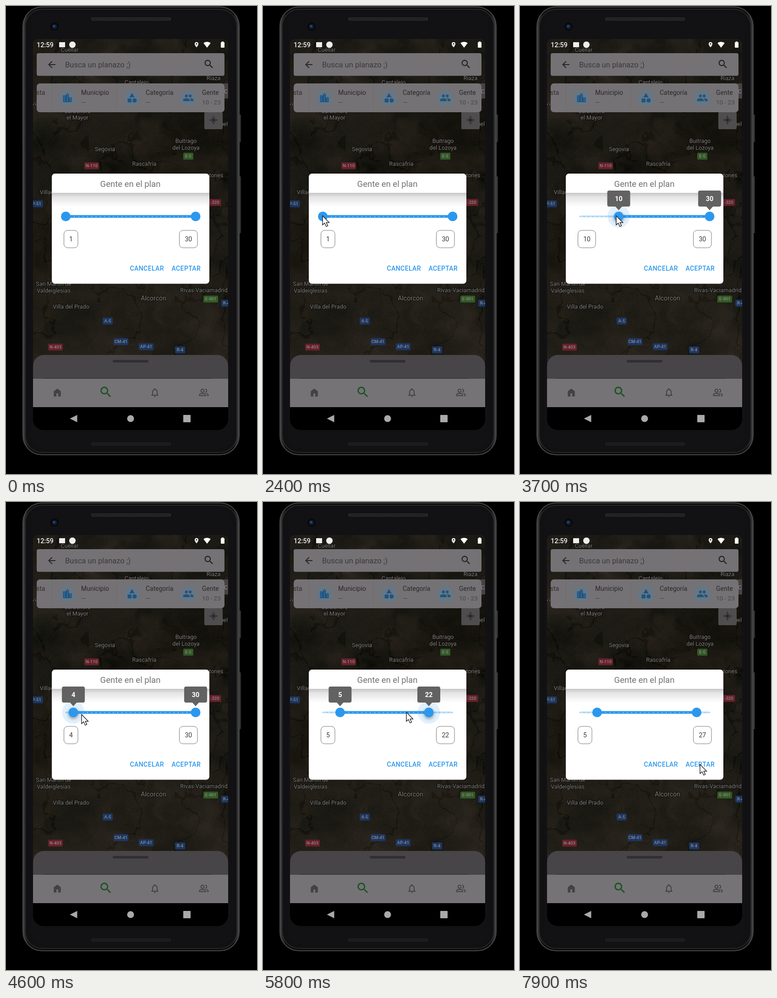
Recreate the animation shown at these times as an HTML page with a canvas. Size 548 by 1022 pixels, loop 8000 ms.

```html
<!DOCTYPE html>
<html lang="es">
<head>
<meta charset="utf-8">
<title>Gente en el plan</title>
<style>
html, body { margin: 0; width: 100%; height: 100%; overflow: hidden; background: #000; }
canvas { display: block; }
</style>
</head>
<body>
<canvas id="stage" width="548" height="1022"></canvas>
<script>
const W = 548, H = 1022, LOOP = 8000, FRAME = 100;
const BLUE = '#2b98ee', DIM = '#747275';
const view = document.getElementById('stage').getContext('2d');
const scene = document.createElement('canvas');
scene.width = W; scene.height = H;
let g = scene.getContext('2d');

function box(x, y, w, h, r, fill, stroke, line = 1) {
  g.beginPath();
  g.roundRect(x, y, w, h, r);
  if (fill) { g.fillStyle = fill; g.fill(); }
  if (stroke) { g.strokeStyle = stroke; g.lineWidth = line; g.stroke(); }
}
function disc(x, y, r, fill) {
  g.beginPath();
  g.arc(x, y, r, 0, 7);
  g.fillStyle = fill;
  g.fill();
}
// y is the middle of the capital letters
function text(s, x, y, size, fill, align = 'left', weight = 400, spacing = 0) {
  g.font = `${weight} ${size}px Roboto, sans-serif`;
  g.letterSpacing = spacing + 'px';
  g.textAlign = align;
  g.fillStyle = fill;
  g.fillText(s, x, y + size * .355);
}
// Paths use a 24 unit grid centred on x, y
function icon(d, x, y, size, fill, stroke) {
  g.save();
  g.translate(x - size / 2, y - size / 2);
  g.scale(size / 24, size / 24);
  const path = new Path2D(d);
  if (fill) { g.fillStyle = fill; g.fill(path, 'evenodd'); }
  if (stroke) { g.strokeStyle = stroke; g.lineWidth = 2; g.stroke(path); }
  g.restore();
}

const ICONS = {
  back: 'M20 11H7.8l5.6-5.6L12 4l-8 8 8 8 1.4-1.4L7.8 13H20z',
  search: 'M15.5 14h-.8l-.3-.3A6.5 6.5 0 1 0 13.7 14.4l.3.3v.8l5 5 1.5-1.5zM9.5 14a4.5 4.5 0 1 1 0-9 4.5 4.5 0 0 1 0 9z',
  city: 'M15 11V5l-3-3-3 3v2H3v14h18V11zM5 9h2v2H5zM5 13h2v2H5zM5 17h2v2H5zM11 5h2v2h-2zM11 9h2v2h-2zM11 13h2v2h-2zM11 17h2v2h-2zM17 13h2v2h-2zM17 17h2v2h-2z',
  category: 'M12 2l-5.5 9h11zM3 13.5h8v8H3zM13 17.5a4.5 4.5 0 1 0 9 0 4.5 4.5 0 1 0-9 0z',
  people: 'M5 8a3 3 0 1 0 6 0 3 3 0 1 0-6 0zM13 8a3 3 0 1 0 6 0 3 3 0 1 0-6 0zM8 13c-2.3 0-7 1.2-7 3.5V19h14v-2.5C15 14.2 10.3 13 8 13zM16 13l-1 .1c1.200.8 2 2 2 3.400V19h6v-2.500c0-2.300-4.700-3.500-7-3.500z',
  group: 'M5.500 8a3.500 3.500 0 1 0 7 0 3.500 3.500 0 1 0-7 0zM2 19v-2c0-4 14-4 14 0v2zM15 4.500a3.500 3.500 0 0 1 0 7M18 14c3 1 4 2 4 5h-3',
  home: 'M4 21V9l8-6 8 6v12h-6v-7h-4v7z',
  bell: 'M12 22a2 2 0 0 0 2-2h-4a2 2 0 0 0 2 2zM18 16v-5c0-3.100-1.600-5.600-4.500-6.300V4a1.500 1.500 0 0 0-3 0v.7C7.600 5.400 6 7.900 6 11v5l-2 2v1h16v-1zM16 17H8v-6c0-2.500 1.500-4.500 4-4.500s4 2 4 4.500z',
  pin: 'M12 2a7 7 0 0 0-7 7c0 5.200 7 13 7 13s7-7.800 7-13a7 7 0 0 0-7-7zM12 11.500a2.500 2.500 0 1 1 0-5 2.500 2.500 0 0 1 0 5z',
  wifi: 'M12 21L1 7c6-5 16-5 22 0z',
  target: 'M8 12a4 4 0 1 0 8 0 4 4 0 1 0-8 0zM5 12a7 7 0 1 0 14 0 7 7 0 1 0-14 0zM6 12a6 6 0 1 0 12 0 6 6 0 1 0-12 0zM11 1h2v4h-2zM11 19h2v4h-2zM1 11h4v2H1zM19 11h4v2h-4z'
};

function hash(x, y) {
  let n = Math.imul(x, 374761393) + Math.imul(y, 668265263);
  n = Math.imul(n ^ (n >>> 13), 1274126177);
  return ((n ^ (n >>> 16)) >>> 0) / 4294967296;
}
function noise(x, y) {
  const i = Math.floor(x), j = Math.floor(y), smooth = v => v * v * (3 - 2 * v);
  const u = smooth(x - i), v = smooth(y - j);
  const top = hash(i, j) * (1 - u) + hash(i + 1, j) * u;
  const low = hash(i, j + 1) * (1 - u) + hash(i + 1, j + 1) * u;
  return top * (1 - v) + low * v;
}
function fractal(x, y) {
  let sum = 0;
  for (let o = 0, a = .5; o < 5; o++, a /= 2, x *= 2, y *= 2) sum += a * noise(x + o * 17, y);
  return sum;
}

function drawTerrain() {
  const w = 426, h = 710, img = g.createImageData(w, h);
  for (let y = 0, p = 0; y < h; y++) for (let x = 0; x < w; x++, p += 4) {
    const warp = fractal(x / 60, y / 60);
    const n = fractal(x / 75 + warp * 2, y / 75 + 9);
    const vein = Math.abs(fractal(x / 95 + 40, y / 95 + warp) - .48);
    const ridge = Math.exp(-(((x * .75 + y - 500) / 105) ** 2));
    const plain = Math.max(0, y - 470) / 240 * (x / w);
    let l = 12 + n * 33 - ridge * 9 + plain * 7 + (hash(x, y) - .5) * 8;
    if (vein < .012) l -= 8;
    const warm = (n - .35) * 9 + plain * 3;
    img.data.set([l + 2 + warm, l + 1, l - 5 - warm * .4, 255], p);
  }
  g.putImageData(img, 59, 72);
}

function drawMapLabels() {
  const names = [
    ['Cuéllar', 139, 96], ['Cantalejo', 285, 167], ['Riaza', 453, 158], ['Carbonero', 156, 230],
    ['el Mayor', 156, 244], ['Segovia', 216, 313], ['Rascafría', 302, 345], ['Buitrago', 393, 295],
    ['del Lozoya', 393, 310], ['La Hiruela', 463, 258], ['tones', 459, 370], ['Villac', 89, 407], ['va', 63, 213],
    ['San Martín de', 104, 607], ['Valdeiglesias', 104, 622], ['Villa del Prado', 142, 657],
    ['Alcorcón', 322, 638, 14], ['Rivas-Vaciamadrid', 432, 621]
  ];
  for (const [s, x, y, size = 12.5] of names) {
    g.strokeStyle = '#0d0c0a';
    g.lineWidth = 2;
    g.font = `400 ${size}px Roboto, sans-serif`;
    g.textAlign = 'center';
    g.strokeText(s, x, y + size * .355);
    text(s, x, y, size, '#827f7c', 'center');
  }
  const red = '#68202b', green = '#315a24', navy = '#1d3763';
  const shields = [
    ['N-110', 187, 349, red], ['E-5', 398, 328, green], ['P-51', 67, 432, navy], ['-320', 456, 429, red],
    ['A-5', 222, 688, navy], ['CM-41', 251, 733, navy], ['AP-41', 306, 744, navy], ['R-4', 380, 751, navy],
    ['N-403', 108, 745, red], ['E-901', 447, 640, green], ['R-4', 481, 649, navy]
  ];
  for (const [s, x, y, fill] of shields) {
    const w = s.length * 5 + 7;
    box(x - w / 2, y - 7.5, w, 15, 2, fill);
    text(s, x, y, 9.5, '#8b898b', 'center', 500);
  }
}

function drawPhone() {
  g.fillStyle = '#000';
  g.fillRect(0, 0, W, H);
  box(509, 237, 4, 60, 1, '#303030');
  box(509, 372, 4, 124, 1, '#303030');
  const rim = g.createLinearGradient(36, 0, 510, 0);
  rim.addColorStop(0, '#484848');
  rim.addColorStop(.03, '#0b0b0b');
  rim.addColorStop(.97, '#0b0b0b');
  rim.addColorStop(1, '#484848');
  box(37, 2, 472, 978, 42, rim, '#484848', 2);
  box(42, 7, 462, 968, 37, '#111012', '#292829', 2);
  box(54, 15, 438, 952, 28, '#121113');
  for (const y of [25, 953]) {
    box(186, y, 174, 7, 3, y < 100 ? '#2a2929' : '#201f1f');
    for (let x = 190; x < 357; x += 4) {
      g.fillStyle = '#151414';
      g.fillRect(x, y + 2, 2, 3);
    }
  }
  disc(106, 45, 9, '#08090d');
  disc(106, 45, 5.5, '#101c31');
  disc(105, 44, 2.5, '#294878');
}

function drawBars() {
  text('12:59', 67, 85, 14.5, '#f2f2f2', 'left', 500);
  box(116, 79, 13, 11, 0, '#eee');
  disc(145, 84.500, 7, '#eee');
  icon(ICONS.pin, 416, 84.500, 14, '#eee');
  icon(ICONS.wifi, 439, 84.500, 17, '#fff');
  box(469, 79, 8, 12, 1, '#fff');
  box(471, 77.500, 4, 3, 0, '#fff');

  box(433, 232, 40, 37, 2, '#4f4d4d');
  icon(ICONS.target, 453, 249, 20, '#252425');
  box(474, 169, 11, 33, 0, '#454344');
  text('C', 476, 187, 12.5, '#929090');

  box(67, 103, 410, 49.500, 4, DIM);
  icon(ICONS.back, 100, 128, 24, '#262526');
  text('Busca un planazo ;)', 129, 128, 16.5, '#3b393b');
  icon(ICONS.search, 443, 127, 25, '#201f20');

  box(67, 169, 410, 63, 7, DIM);
  text('sta', 66, 189, 14, '#302e30');
  g.fillStyle = '#6b696c';
  g.fillRect(100, 177, 1, 47);
  g.fillRect(241, 177, 1, 47);
  const filters = [
    ['city', 134, 'Municipio', 164, '—'],
    ['category', 275, 'Categoría', 305, '—'],
    ['people', 398, 'Gente', 428, '10 - 23']
  ];
  for (const [name, cx, label, x, value] of filters) {
    disc(cx, 201, 20, '#6a757f');
    icon(ICONS[name], cx, 200.500, 25, '#175588');
    text(label, x, 189, 14, '#2b292b');
    text(value, x, 210, 13.5, '#464446');
  }

  box(59, 762, 426, 60, [24, 24, 0, 0], '#474548');
  box(233, 773, 78, 5.500, 3, '#302e30');
  g.fillStyle = '#333134';
  g.fillRect(80, 812.500, 370, 1);
  g.fillStyle = '#757376';
  g.fillRect(59, 814, 426, 62);
  icon(ICONS.home, 112, 844, 23, '#434144');
  icon(ICONS.search, 218, 843, 31, '#18521d');
  icon(ICONS.bell, 325, 844, 24, '#434144');
  icon(ICONS.group, 432, 844, 23, null, '#434144');
  g.fillStyle = '#000';
  g.fillRect(59, 876, 426, 50);
  icon('M0 12L24 0v24z', 147.500, 901, 16, '#aaa8aa');
  disc(272, 901, 7.500, '#aaa8aa');
  box(387, 893, 16, 16, 1, '#aaa8aa');
}

function drawDialog() {
  box(100, 366, 344, 240.500, 7, '#fff');
  const shade = g.createLinearGradient(0, 408, 0, 438);
  shade.addColorStop(0, '#c6c6c8');
  shade.addColorStop(.3, '#e4e4e5');
  shade.addColorStop(1, '#fff');
  g.fillStyle = shade;
  g.fillRect(100, 408, 344, 30);
  text('Gente en el plan', 271.500, 388, 18.5, '#727272', 'center');
  text('CANCELAR', 270.500, 573.500, 14, BLUE, 'left', 500, .4);
  text('ACEPTAR', 361.500, 573.500, 14, BLUE, 'left', 500, .4);
}

function buildScene() {
  drawPhone();
  g.save();
  g.beginPath();
  g.roundRect(59, 72, 426, 854, [9, 9, 24, 24]);
  g.clip();
  g.fillStyle = '#000';
  g.fillRect(59, 72, 426, 854);
  const terrain = document.createElement('canvas'), main = g;
  terrain.width = W; terrain.height = H;
  g = terrain.getContext('2d');
  drawTerrain();
  g = main;
  g.drawImage(terrain, 0, 0);
  drawMapLabels();
  drawBars();
  drawDialog();
  g.restore();
}

// Tracks hold [ms, value, ...]; the slider has 30 divisions for values 1 to 30
const LOW = [[2700, 0], [3500, 9], [3800, 9], [4300, 1], [4500, 1], [4600, 1.75], [4700, 3], [4800, 4]];
const HIGH = [[5500, 30], [5800, 24.5], [5900, 22], [6100, 20], [6300, 20], [6500, 22], [6600, 24], [6900, 27]];
const POINTER = [
  [1700, 215, 560], [2300, 130, 458], [2700, 130, 458], [3500, 215, 458], [3700, 210, 458], [4200, 138, 460],
  [4400, 140, 462], [4600, 165, 464], [4900, 168, 464], [5300, 412, 459], [5400, 412, 459], [5800, 313, 459],
  [6200, 320, 459], [6500, 363, 461], [6800, 386, 462], [7200, 386, 462], [7700, 393, 573]
];
const PRESSES = { low: [2600, 4900], high: [5300, 7000] };

function at(track, t, i = 1) {
  const next = track.findIndex(key => key[0] > t);
  if (next === 0) return track[0][i];
  if (next < 0) return track.at(-1)[i];
  const a = track[next - 1], b = track[next];
  return a[i] + (b[i] - a[i]) * (t - a[0]) / (b[0] - a[0]);
}
const tickX = k => 130.5 + k * 283.5 / 30;
const amount = k => Math.round(1 + Math.round(k) * 29 / 30);
// 0 to 1 as a press begins, back to 0 after release
const pressed = ([from, to], t) =>
  Math.max(0, Math.min(1, (t - from) / 200, (to + 200 - t) / 200));

function drawThumb(x, press) {
  if (press) {
    disc(x, 459.5, 24.5 * press, 'rgba(43,152,238,.14)');
    g.shadowColor = 'rgba(0,0,0,.4)';
    g.shadowBlur = 7 * press;
    g.shadowOffsetY = 3 * press;
  }
  disc(x, 459.5, 10.5, BLUE);
  g.shadowColor = 'transparent';
}
function drawTip(x, value, scale) {
  g.save();
  g.translate(x, 446);
  g.scale(scale, scale);
  box(-25, -43, 50, 35, 4, '#626262');
  g.beginPath();
  g.moveTo(-8, -9);
  g.lineTo(0, 0);
  g.lineTo(8, -9);
  g.fill();
  text(value, 0, -25.5, 14.5, '#fff', 'center', 700);
  g.restore();
}
function drawSlider(t) {
  const lowX = tickX(at(LOW, t)), highX = tickX(at(HIGH, t));
  const low = amount(at(LOW, t + FRAME)), high = amount(at(HIGH, t + FRAME));
  const lowPress = pressed(PRESSES.low, t), highPress = pressed(PRESSES.high, t);
  box(131, 457.5, 283, 4, 2, '#bfe0fa');
  box(lowX, 456.5, highX - lowX, 6, 0, BLUE);
  for (let k = 0; k <= 30; k++) {
    const x = tickX(k);
    disc(x, 459.5, 1.1, x > lowX && x < highX ? '#a8d5f9' : '#72b9ee');
  }
  drawThumb(lowX, lowPress);
  drawThumb(highX, highPress);

  const lowWidth = low > 9 ? 39 : 31, highWidth = high > 9 ? 39.5 : 31;
  box(126.5, 490, lowWidth - .5, 38, 8, null, '#777');
  text(low, 126.5 + lowWidth / 2, 509.5, 14, '#373737', 'center');
  box(418 - highWidth, 490, highWidth, 38, 8, null, '#777');
  text(high, 418 - highWidth / 2, 509.5, 14, '#373737', 'center');

  const tip = Math.max(lowPress, highPress);
  if (tip) {
    drawTip(lowX, low, tip);
    drawTip(highX, high, tip);
  }
}
function drawPointer(t) {
  if (t < POINTER[0][0]) return;
  g.save();
  g.translate(at(POINTER, t), at(POINTER, t, 2));
  const arrow = new Path2D('M0 0V20L4.5 16 8 23.5 11.500 22 8.200 14.800H14.500Z');
  g.fillStyle = '#fff';
  g.strokeStyle = '#111';
  g.lineWidth = 1.300;
  g.fill(arrow);
  g.stroke(arrow);
  g.restore();
}

buildScene();
g = view;
const start = performance.now();
function render(now) {
  const t = Math.floor(Math.max(0, now - start) % LOOP / FRAME) * FRAME;
  g.drawImage(scene, 0, 0);
  drawSlider(t);
  drawPointer(t);
  requestAnimationFrame(render);
}
render(start);
</script>
</body>
</html>
```
